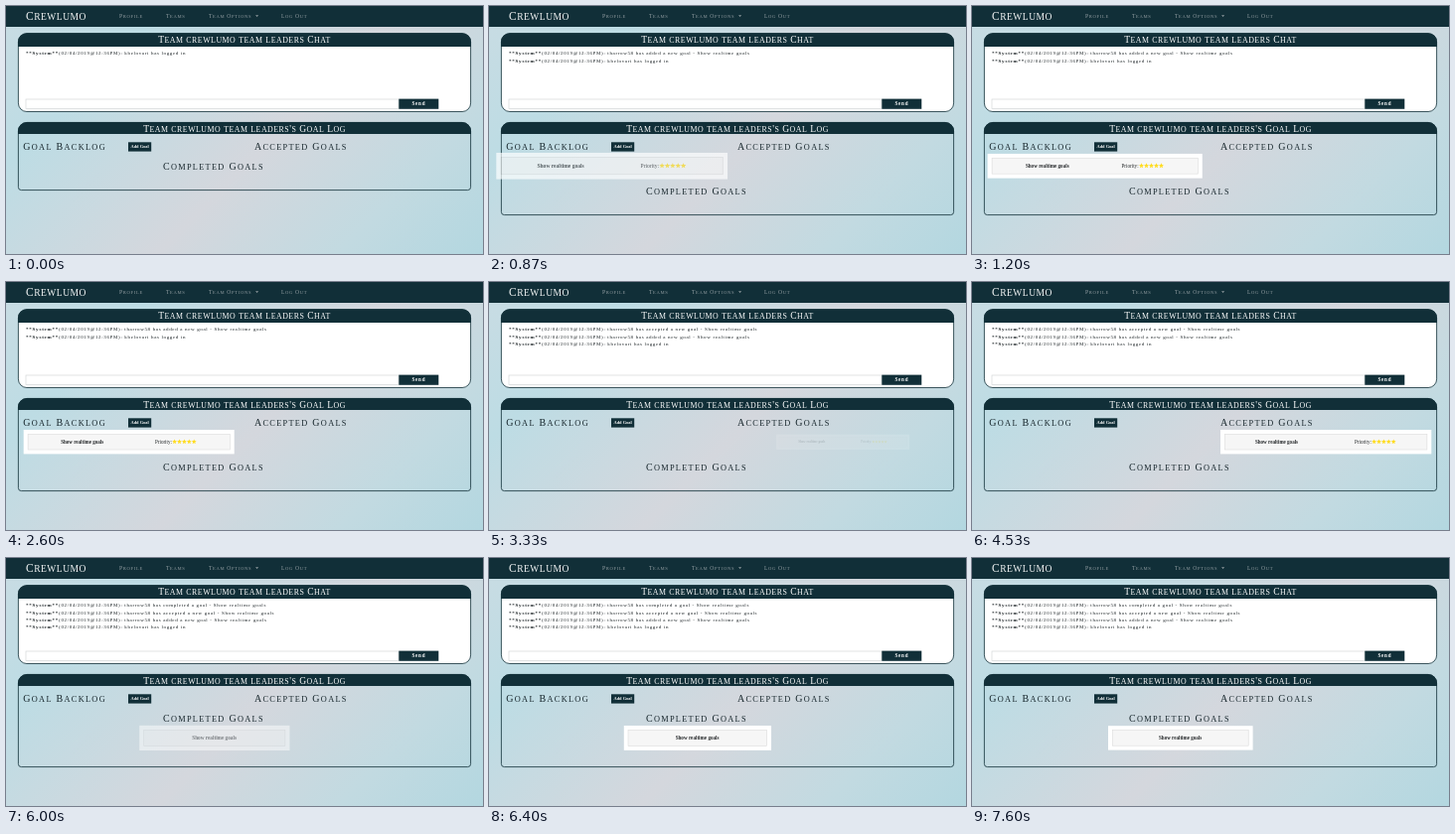
Recreate the animation shown at these times as an HTML page. Size 480 by 250 pixels, loop 7740 ms.

```html
<!DOCTYPE html>
<html lang="en">
<head>
<meta charset="utf-8">
<title>Team goals</title>
<style>
  html, body { margin: 0; width: 100%; height: 100%; overflow: hidden; }
  svg { display: block; width: 100vw; height: 100vh; }
  text { font-family: "Liberation Serif", "Times New Roman", serif; white-space: pre; }
  .small { font-size: .83em; text-transform: uppercase; }
  .bold { font-weight: bold; }
  .chat { font-size: 5px; letter-spacing: .65px; fill: #1d2427; }
  .chat .bold { letter-spacing: .78px; }
  .card { transform-box: fill-box; transform-origin: center; }
  .card text { font-size: 5.05px; fill: #26292b; }
</style>
</head>
<body>
<svg id="stage" viewBox="0 0 480 250" preserveAspectRatio="none"></svg>
<script>
const LOOP = 7740, FPS = 15, BOUNCE = 1000;
const ADDED = 660, ACCEPTED = 3260, COMPLETED = 5990;
const DARK = '#112f38', INK = '#17262c';
const stage = document.getElementById('stage');

const rect = (x, y, w, h, attrs) =>
  `<rect x="${x}" y="${y}" width="${w}" height="${h}" ${attrs}/>`;

const label = (text, x, y, attrs = '') => `<text x="${x}" y="${y}" ${attrs}>${text}</text>`;

// Lower-case letters become smaller capitals.
const capitals = (text, x, y, size, spacing, fill, anchor = 'start') => label(
  text.replace(/[a-z]+/g, run => `<tspan class="small">${run}</tspan>`), x, y,
  `font-size="${size}" letter-spacing="${spacing}" fill="${fill}" text-anchor="${anchor}"`);

const header = (y, height, text) =>
  `<path d="M12 ${y + height}v${9 - height}a9 9 0 0 1 9-9h438a9 9 0 0 1 9 9v${height - 9}z" fill="${DARK}"/>` +
  capitals(text, 240, y + 9.6, 9.5, .5, '#fff', 'middle');

const goalOutline = bottom =>
  `M12.4 126a8.6 8.6 0 0 1 8.6-8.6h438a8.6 8.6 0 0 1 8.6 8.6V${bottom - 3}a3 3 0 0 1-3 3H15.4a3 3 0 0 1-3-3z`;

function star(cx, cy, radius) {
  const points = Array.from({ length: 10 }, (_, i) => {
    const r = i % 2 ? radius * .45 : radius, angle = i * Math.PI / 5;
    return `${cx + r * Math.sin(angle)},${cy - r * Math.cos(angle)}`;
  });
  return `<polygon points="${points.join(' ')}" fill="#ffdc20"/>`;
}

function card(x, y, width, labelX, priorityX) {
  const stars = priorityX
    ? [0, 1, 2, 3, 4].map(i => star(priorityX + 19.6 + i * 4.9, y + 12, 2.6)).join('') : '';
  return `<g class="card">
    ${rect(x, y, width, 24.4, 'fill="#fff"')}
    ${rect(x + 4.4, y + 4.4, width - 8.8, 15.6, 'fill="#f6f6f6" stroke="#dcdcdc" stroke-width=".6"')}
    ${label('Show realtime goals', labelX, y + 13.8, 'class="bold" text-anchor="middle"')}
    ${priorityX ? label('Priority:', priorityX, y + 13.8) : ''}${stars}</g>`;
}

const messages = [
  { at: 0, text: 'kbelovari has logged in' },
  { at: ADDED, text: 'tharrow58 has added a new goal - Show realtime goals' },
  { at: ACCEPTED, text: 'tharrow58 has accepted a new goal - Show realtime goals' },
  { at: COMPLETED, text: 'tharrow58 has completed a goal - Show realtime goals' }
];

const cards = [
  { from: ADDED, until: ACCEPTED, start: 684, shape: [17.7, 149, 212, 76.7, 150] },
  { from: ACCEPTED, until: COMPLETED, start: 3302, shape: [250, 149, 212.3, 306.5, 385] },
  { from: COMPLETED, until: LOOP, start: 5882, shape: [137, 169.2, 145.6, 209.6, 0] }
];

stage.innerHTML = `
  <defs>
    <linearGradient id="sky" gradientUnits="userSpaceOnUse" x1="0" y1="0" x2="365" y2="365">
      <stop offset="0" stop-color="#c9dce3"/>
      <stop offset=".22" stop-color="#bddce4"/>
      <stop offset=".55" stop-color="#d4d7dd"/>
      <stop offset=".8" stop-color="#c2dae1"/>
      <stop offset="1" stop-color="#b3d7e0"/>
    </linearGradient>
  </defs>
  ${rect(0, 0, 480, 250, 'fill="url(#sky)"')}
  ${rect(0, 0, 480, 21, `fill="${DARK}"`)}
  ${capitals('Crewlumo', 20, 14, 11.5, .5, '#f4f6f6')}
  ${[['Profile', 114], ['Teams', 161], ['Team Options', 204], ['Log Out', 277]]
    .map(([text, x]) => capitals(text, x, 12.4, 5.6, .65, '#929da1')).join('')}
  <path d="M251 9.2h3.2l-1.6 1.7z" fill="#929da1"/>

  ${rect(12.4, 27.6, 455.2, 78.9, `rx="8.6" fill="#fff" stroke="${DARK}" stroke-width=".8"`)}
  ${header(27.2, 13.8, 'Team crewlumo team leaders Chat')}
  ${rect(20, 94, 375, 9.4, 'fill="#fff" stroke="#d3d6d8" stroke-width=".7"')}
  ${rect(395.3, 93.6, 40, 10.2, `fill="${DARK}"`)}
  ${label('Send', 415.4, 100.4, 'class="bold" font-size="5.1" letter-spacing=".8" fill="#fff" text-anchor="middle"')}
  ${messages.map(({ text }) => label(
    `<tspan class="bold">**System**</tspan>(02/04/2019@12:36PM): ${text}`, 20, 0, 'class="chat"')).join('')}

  <path id="goals" fill="none" stroke="${DARK}" stroke-width=".8"/>
  ${header(117, 12, 'Team crewlumo team leaders\'s Goal Log')}
  ${capitals('Goal Backlog', 17.3, 145, 10, 1.3, INK)}
  ${capitals('Accepted Goals', 250, 145, 10, 1.3, INK)}
  <g id="completed">${capitals('Completed Goals', 158, 165, 10, 1.3, INK)}</g>
  ${rect(123, 137.3, 23.2, 9.3, `fill="${DARK}"`)}
  ${label('Add Goal', 134.6, 143.4, 'class="bold" font-size="4.4" fill="#fff" text-anchor="middle"')}
  ${cards.map(({ shape }) => card(...shape)).join('')}`;

const goals = document.getElementById('goals');
const completed = document.getElementById('completed');
const lines = [...stage.querySelectorAll('.chat')];
const cardNodes = [...stage.querySelectorAll('.card')];

const easing = 'cubic-bezier(.215,.61,.355,1)';
const bounceIn = [
  { offset: 0, transform: 'scale(.3)', opacity: 0, easing },
  { offset: .2, transform: 'scale(1.1)', easing },
  { offset: .4, transform: 'scale(.9)', easing },
  { offset: .6, transform: 'scale(1.03)', opacity: 1, easing },
  { offset: .8, transform: 'scale(.97)', easing },
  { offset: 1, transform: 'scale(1)', opacity: 1 }
];
const bounces = cardNodes.map(node => {
  const bounce = node.animate(bounceIn, { duration: BOUNCE, fill: 'both' });
  bounce.pause();
  return bounce;
});

function draw(now) {
  const time = Math.floor((now % LOOP) * FPS / 1000 + .06) * 1000 / FPS;
  const shown = messages.filter(message => time >= message.at).length;
  lines.forEach((line, i) => {
    line.style.display = i < shown ? '' : 'none';
    line.setAttribute('y', 49.4 + (shown - 1 - i) * 7.3);
  });
  // A card in the upper row pushes the lower heading down.
  const upperRowFilled = time >= ADDED && time < COMPLETED;
  completed.setAttribute('transform', `translate(0 ${upperRowFilled ? 25 : 0})`);
  goals.setAttribute('d', goalOutline(time >= ADDED ? 210.6 : 185.6));
  cards.forEach(({ from, until, start }, i) => {
    cardNodes[i].style.display = time >= from && time < until ? '' : 'none';
    bounces[i].currentTime = Math.min(BOUNCE, Math.max(0, time - start));
  });
}

const began = performance.now();
function tick() {
  draw(performance.now() - began);
  requestAnimationFrame(tick);
}
tick();
</script>
</body>
</html>
```
